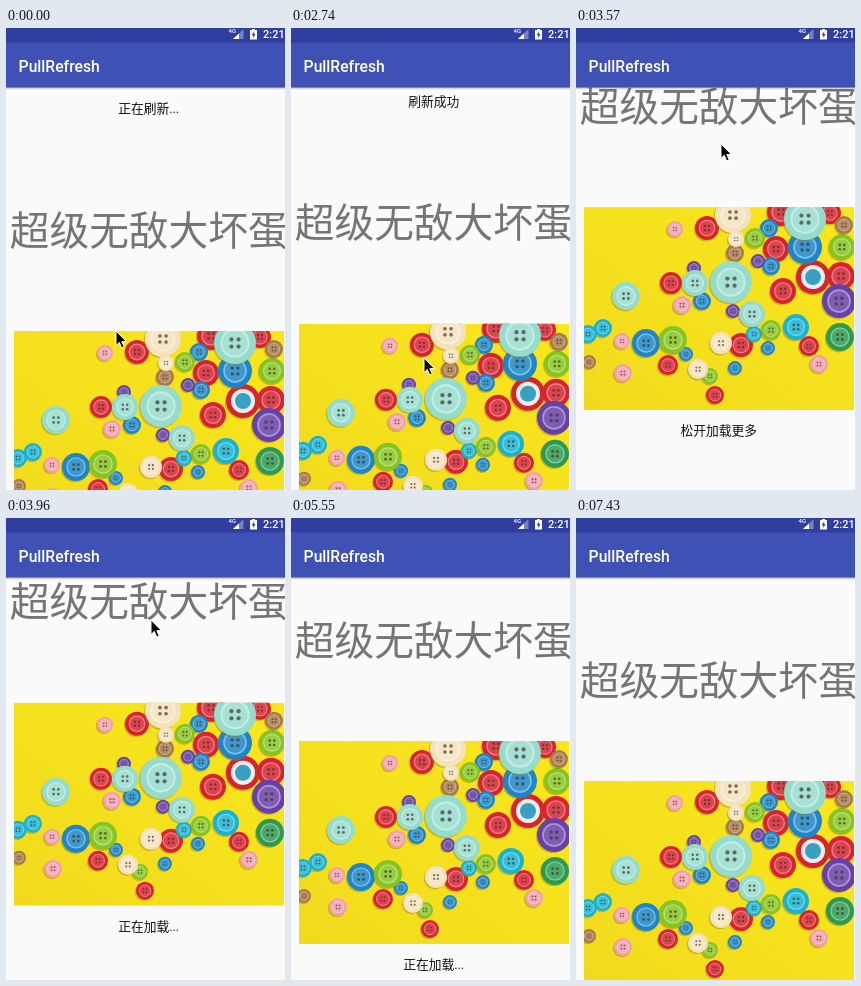
Write an HTML page that moves like this. It is 279 px wide and 462 px high and loops after 7.93 s.

```html
<!DOCTYPE html>
<html lang="zh-CN">
<head>
<meta charset="utf-8">
<title>PullRefresh</title>
<style>
  html, body { margin: 0; width: 100%; height: 100%; overflow: hidden; background: #fafafa; }
  svg { display: block; width: 100vw; height: 100vh; }
  text { font-family: Roboto, "Noto Sans CJK SC", "Noto Sans CJK", sans-serif; }
  .title { font-size: 39.7px; fill: #757575; }
  .hint { font-size: 12.75px; fill: #111; text-anchor: middle; }
  .bar { fill: #fff; font-weight: 500; }
</style>
</head>
<body>
<svg viewBox="0 0 279 462">
  <defs>
    <linearGradient id="sun" x1="0" y1="1" x2="1" y2="0">
      <stop offset="0" stop-color="#f1da1d"/>
      <stop offset="1" stop-color="#f9e71c"/>
    </linearGradient>
    <linearGradient id="shade" x1="0" y1="0" x2="0" y2="1">
      <stop offset="0" stop-color="#000" stop-opacity=".28"/>
      <stop offset="1" stop-color="#000" stop-opacity="0"/>
    </linearGradient>
    <clipPath id="frame"><rect width="270" height="203"/></clipPath>
  </defs>
  <rect width="279" height="462" fill="#fafafa"/>
  <g id="content">
    <text id="top" class="hint" x="142.7" y="44.8"></text>
    <text class="title" x="3.8" y="176.6">超级无敌大坏蛋</text>
    <g transform="translate(8 263)" clip-path="url(#frame)">
      <rect width="270" height="203" fill="url(#sun)"/>
      <g id="buttons" transform="translate(-8 0)"></g>
    </g>
    <text id="bottom" class="hint" x="142.7" y="490.8"></text>
  </g>
  <rect y="59" width="279" height="3" fill="url(#shade)"/>
  <rect width="279" height="59.5" fill="#3f51b5"/>
  <rect width="279" height="14.5" fill="#303f9f"/>
  <text class="bar" x="12.6" y="43.6" font-size="15.7">PullRefresh</text>
  <text class="bar" x="222.5" y="5" font-size="6">4G</text>
  <path d="M237.5 1V11H227Z" fill="#fff" fill-opacity=".35"/>
  <path d="M233 5.5V11H227Z" fill="#fff"/>
  <path d="M244 2H246V1H249V2H251V11.5H244Z" fill="#fff"/>
  <path d="M248.2 3.5L245.6 7.2H247.2V10L249.6 6.2H248.2Z" fill="#303f9f"/>
  <text class="bar" x="257" y="10.4" font-size="11">2:21</text>
  <path id="cursor" d="M0 0V14.5L3.3 11.4L5.7 17L8.2 15.9L5.8 10.6H10.4Z"
        fill="#000" stroke="#fff" stroke-width="1"/>
</svg>
<script>
const LOOP = 7930;
const $ = id => document.getElementById(id);

// Buttons by colour: centre x, centre y, radius.
const discs = [
  ["#d8232f", [205,5,14, 254,6,11, 131,21,12, 200,42,13, 237,70,17, 265,69,14,
               207,84,13, 95,76,11, 92,158,10, 165,138,12, 233,139,10, 139,188,9]],
  ["#1c86c8", [193,21,9, 229,40,17, 195,59,9, 126,94,9, 70,136,14, 110,147,7, 192,141,7, 159,161,7]],
  ["#19b3d2", [27,121,9, 12,127,9, 220,120,13, 178,127,8]],
  ["#86c51f", [179,31,10, 266,40,13, 97,133,14, 195,123,10, 134,169,8]],
  ["#2c9a50", [264,130,14]],
  ["#6741a8", [182,54,7, 118,61,7, 157,104,7, 263,94,17]],
  ["#f3a0ae", [99,22,8, 106,98,9, 46,134,8, 243,157,9, 47,166,9]],
  ["#a8794a", [268,18,9, 159,46,9, 13,155,7]],
  ["#f4e2bd", [157,8,18, 160,32,8, 145,136,11, 122,162,10]],
  ["#96dccd", [229,12,21, 119,76,13, 50,89,14, 176,107,13, 155,75,21]]
];

function disc(x, y, r, color) {
  const d = r * 0.17, h = Math.max(0.6, r * 0.1);
  const hole = (sx, sy) =>
    `<circle cx="${x + sx * d}" cy="${y + sy * d}" r="${h}" fill="#40372b" fill-opacity=".7"/>`;
  return `<circle cx="${x - 1.2}" cy="${y + 1.3}" r="${r}" fill="#8d7412" fill-opacity=".4"/>
    <circle cx="${x}" cy="${y}" r="${r}" fill="${color}"/>
    <circle cx="${x}" cy="${y}" r="${r * 0.65}" fill="#fff" fill-opacity=".15"
      stroke="#fff" stroke-opacity=".4" stroke-width="${r * 0.1}"/>` +
    hole(-1, -1) + hole(1, -1) + hole(-1, 1) + hole(1, 1);
}

let art = "";
for (const [color, list] of discs)
  for (let i = 0; i < list.length; i += 3)
    art += disc(list[i], list[i + 1], list[i + 2], color);
art += `<circle cx="237" cy="70" r="12" fill="#e9eee8"/><circle cx="237" cy="70" r="8" fill="#3b9fc4"/>`;
$("buttons").innerHTML = art;

// Pointer path: time, x, y.
const path = [
  [0, 110, 303], [430, 110, 303], [690, 138, 334], [900, 138, 334],
  [1090, 141, 335], [1280, 141, 335], [1380, 134, 331], [2309, 134, 331],
  [2310, 133, 330], [2980, 133, 330], [3150, 147, 331], [3300, 146, 326],
  [3480, 146, 176], [3570, 145, 116], [3720, 145, 102], [5070, 145, 102],
  [5250, 175, 150], [5400, 225, 260], [5550, 281, 462], [LOOP, 281, 462]
];

function pointer(t) {
  const i = path.findIndex(p => p[0] > t);
  const [t0, x0, y0] = path[i - 1], [t1, x1, y1] = path[i];
  const k = (t - t0) / (t1 - t0);
  return [x0 + (x1 - x0) * k, y0 + (y1 - y0) * k];
}

function glide(t, start, end, from, to) {
  const k = Math.min(1, Math.max(0, (t - start) / (end - start)));
  return from + (to - from) * (1 - Math.cos(Math.PI * k)) / 2;
}

const drag = y => Math.min(0, (y - 331) * 0.39);

function offset(t, y) {
  if (t < 3150) return glide(t, 2660, 2950, 40, 0);
  if (t < 3870) return drag(y);
  if (t < 7110) return glide(t, 3870, 4160, drag(102), -40);
  return glide(t, 7110, 7430, -40, 0);
}

function bottomHint(t, shift) {
  if (t < 3870) return shift > -40 ? "上拉加载更多" : "松开加载更多";
  return t < 7125 ? "正在加载..." : "加载成功";
}

function setText(id, value) {
  const el = $(id);
  if (el.textContent !== value) el.textContent = value;
}

function draw(t) {
  const [x, y] = pointer(t);
  const shift = offset(t, y);
  $("content").setAttribute("transform", `translate(0 ${shift.toFixed(2)})`);
  $("cursor").setAttribute("transform", `translate(${x.toFixed(2)} ${y.toFixed(2)})`);
  setText("top", t < 2680 ? "正在刷新..." : "刷新成功");
  setText("bottom", bottomHint(t, shift));
}

const start = performance.now();
function tick() {
  draw((performance.now() - start) % LOOP);
  requestAnimationFrame(tick);
}
tick();
</script>
</body>
</html>
```
